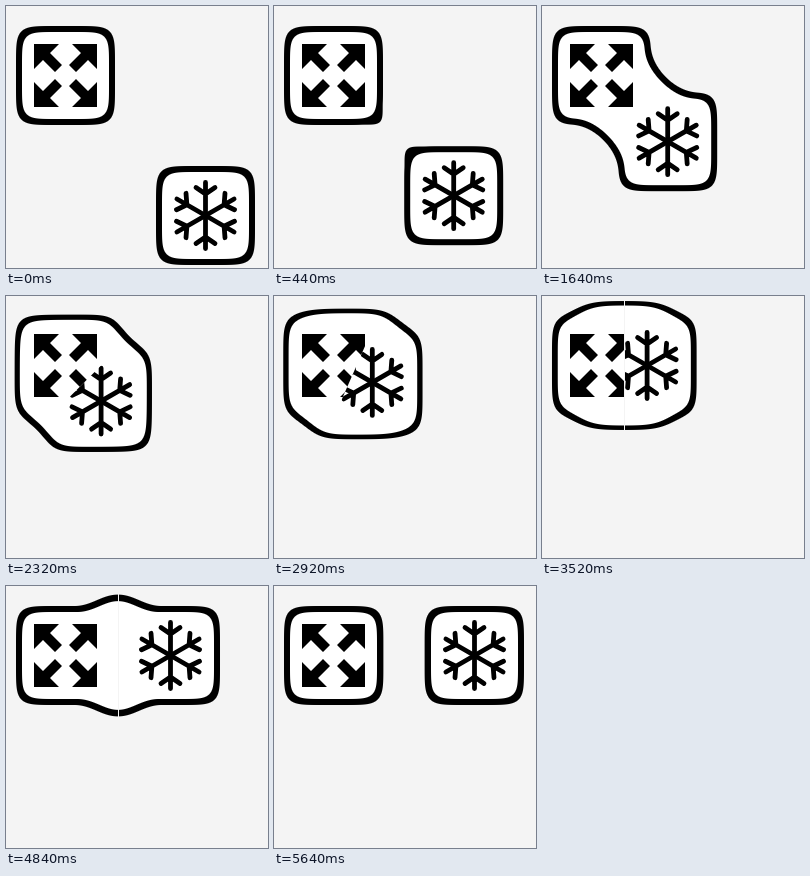
Recreate the animation shown at these times as an HTML page with a canvas. Size 262 by 262 pixels, loop 5.68 s.

```html
<!DOCTYPE html>
<html lang="en">
<head>
<meta charset="utf-8">
<title>Merging tiles</title>
<style>
html, body { margin: 0; width: 100%; height: 100%; overflow: hidden; background: #f4f4f4; }
canvas { display: block; width: 262px; height: 262px; }
</style>
</head>
<body>
<canvas id="stage" width="262" height="262"></canvas>
<script>
const SIZE = 262, LOOP = 5680, STEP = 40;
const HALF = 49.5, LINE = 6, BLEND = 2.79, PAPER = 244;
const INNER = ((HALF - LINE) / HALF) ** 2;
const SPEED = 0.045;
const home = { x: 59.5, y: 69.5 };
const ctx = document.getElementById('stage').getContext('2d');
const image = ctx.createImageData(SIZE, SIZE);
const W = SIZE + 2;
const field = new Float32Array(W * W);
const clamp = v => Math.max(0, Math.min(1, v));

// Offset of the moving tile from the fixed one: diagonal in, up, then out to the right.
const turn = { t: 2360, d: 140 - 2360 * SPEED };
const exit = { t: 3480, d: 3480 * SPEED - 112.8 };

function offset(t) {
  if (t < turn.t) {
    const d = 140 - SPEED * t;
    return { x: d, y: d };
  }
  if (t < exit.t) {
    const p = (t - turn.t) / (exit.t - turn.t);
    return { x: turn.d + (exit.d - turn.d) * p, y: turn.d * (1 - p) };
  }
  return { x: SPEED * t - 112.8, y: 0 };
}

// Squared superellipse radius around c; 1 on the outer edge of a tile.
function tile(x, y, c) {
  const xx = (x - c.x) * (x - c.x), yy = (y - c.y) * (y - c.y);
  return Math.cbrt(xx * xx * xx + yy * yy * yy) / (HALF * HALF);
}

function smoothMin(a, b) {
  const h = Math.max(BLEND - Math.abs(a - b), 0) / BLEND;
  return Math.min(a, b) - h * h * BLEND / 4;
}

function drawBlob(b) {
  for (let j = 0, i = 0; j < W; j++)
    for (let k = 0; k < W; k++, i++)
      field[i] = smoothMin(tile(k - 0.5, j - 0.5, home), tile(k - 0.5, j - 0.5, b));

  const px = image.data;
  for (let y = 0, o = 0; y < SIZE; y++)
    for (let x = 0; x < SIZE; x++, o += 4) {
      const i = (y + 1) * W + x + 1;
      const gx = field[i + 1] - field[i - 1], gy = field[i + W] - field[i - W];
      const slope = Math.max(Math.sqrt(gx * gx + gy * gy) / 2, 0.005);
      const outer = clamp(0.5 + (1 - field[i]) / slope);
      const inner = clamp(0.5 + (INNER - field[i]) / slope);
      px[o] = px[o + 1] = px[o + 2] = PAPER * (1 - outer) + 255 * inner;
      px[o + 3] = 255;
    }
  ctx.putImageData(image, 0, 0);
}

const arrow = new Path2D('M-31.5-31.5h25l-9 9l12 12l-7 7l-12-12l-9 9z');
const arm = new Path2D('M0 0V-33M-9.5-28L0-21.5L9.5-28');

function spokes(count, paint) {
  for (let n = 0; n < count; n++) {
    paint();
    ctx.rotate(2 * Math.PI / count);
  }
}

// Each icon shows only on its own side of the line halfway between the tiles.
function drawIcon(c, other, paint) {
  ctx.save();
  ctx.translate((c.x + other.x) / 2, (c.y + other.y) / 2);
  const angle = Math.atan2(c.y - other.y, c.x - other.x);
  ctx.rotate(angle);
  ctx.beginPath();
  ctx.rect(0, -400, 400, 800);
  ctx.clip();
  ctx.rotate(-angle);
  ctx.translate((c.x - other.x) / 2, (c.y - other.y) / 2);
  paint();
  ctx.restore();
}

ctx.lineWidth = 4.8;
ctx.lineCap = ctx.lineJoin = 'round';

function draw(t) {
  const d = offset(t);
  const b = { x: home.x + d.x, y: home.y + d.y };
  drawBlob(b);
  ctx.fillStyle = ctx.strokeStyle = '#000';
  drawIcon(home, b, () => spokes(4, () => ctx.fill(arrow)));
  drawIcon(b, home, () => spokes(6, () => ctx.stroke(arm)));
  if (d.y === 0) {
    ctx.fillStyle = '#f4f4f4';
    ctx.fillRect(Math.floor((home.x + b.x) / 2), 0, 1, SIZE);
  }
}

const start = performance.now();
let shown = -1;
function tick() {
  const t = Math.floor((performance.now() - start) % LOOP / STEP) * STEP;
  if (t !== shown) draw(shown = t);
  requestAnimationFrame(tick);
}
tick();
</script>
</body>
</html>
```
